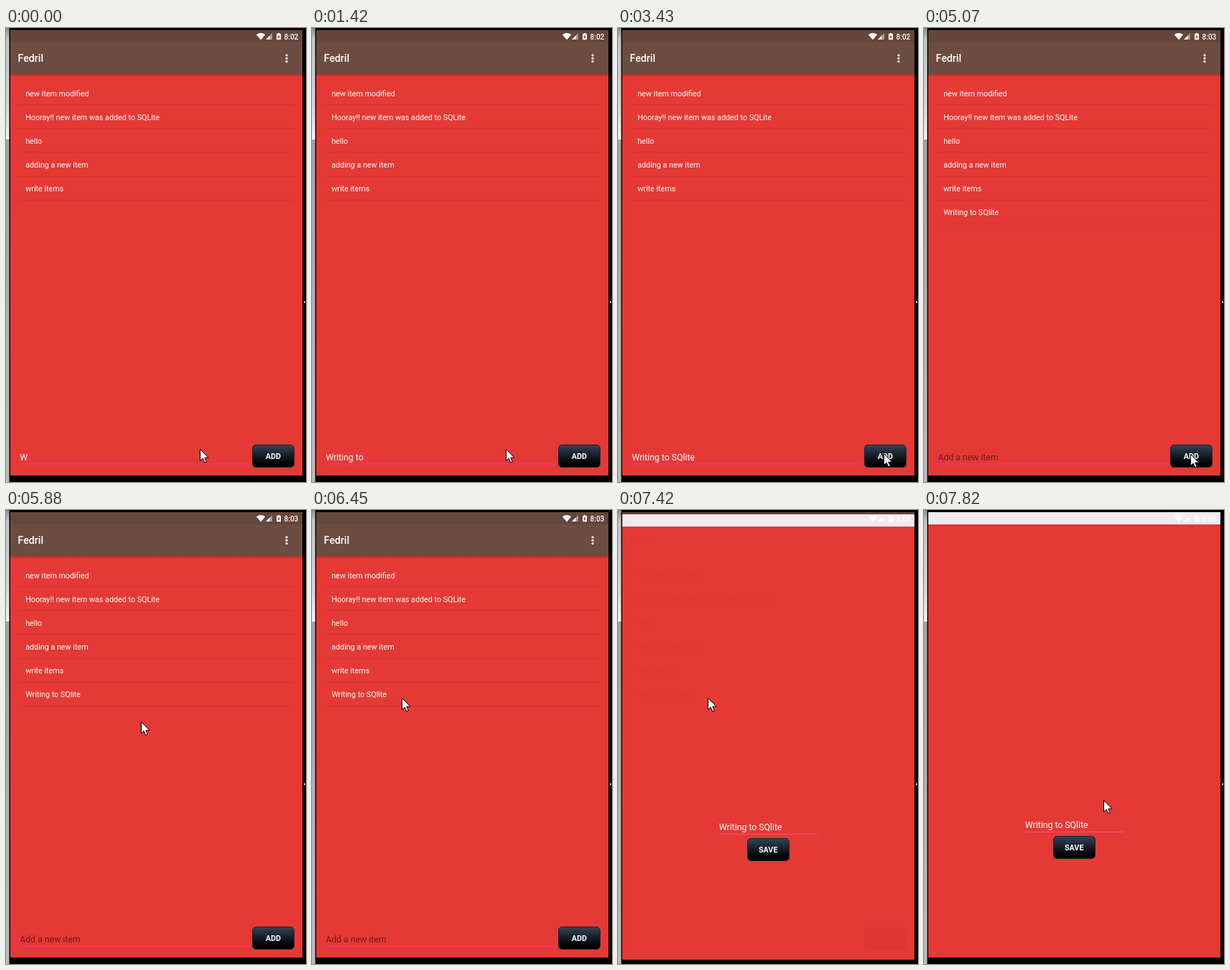
These frames come from a looping animation (418 by 631 pixels, 8000 ms). An HTML page:

```html
<!DOCTYPE html>
<html lang="en">
<head>
<meta charset="utf-8">
<title>To-do list</title>
<style>
html, body { margin: 0; width: 100%; height: 100%; overflow: hidden; background: #000; }
svg { display: block; width: 418px; height: 631px; }
text { font-family: Roboto, "Noto Sans", sans-serif; fill: #fff; white-space: pre; }
.field { font-size: 12.28px; }
.item { font-size: 10.75px; }
.label { font-size: 10.75px; font-weight: 700; text-anchor: middle; }
.title { font-size: 14.2px; font-weight: 500; }
.clock { font-size: 10px; font-weight: 500; }
.hint { fill: #000; opacity: .52; }
.line { fill: #ff2f86; opacity: .8; }
.caret { fill: #f5207c; }
.divider { fill: #000; opacity: .09; }
.ghost text { fill: #000; }
.ghost .divider, .ghost .entry { display: none; }
</style>
</head>
<body>
<svg viewBox="0 0 418 631">
  <defs>
    <linearGradient id="dark" x2="0" y2="1">
      <stop offset="0" stop-color="#33455a"/>
      <stop offset=".5" stop-color="#141c26"/>
      <stop offset=".85" stop-color="#000"/>
    </linearGradient>
    <linearGradient id="shade" x2="0" y2="1">
      <stop offset="0" stop-opacity=".22"/>
      <stop offset="1" stop-opacity="0"/>
    </linearGradient>
    <linearGradient id="edgeTop" x2="0" y2="1">
      <stop offset="0" stop-color="#8c8c8c"/>
      <stop offset=".1" stop-color="#c4c4c4"/>
      <stop offset=".7" stop-color="#d6d6d6"/>
      <stop offset="1" stop-color="#f2f2f2"/>
    </linearGradient>
    <linearGradient id="edgeLow" x2="0" y2="1">
      <stop offset="0" stop-color="#a2a2a2"/>
      <stop offset=".5" stop-color="#b0b0b0"/>
      <stop offset="1" stop-color="#bcbcbc"/>
    </linearGradient>
    <g id="button">
      <rect x=".5" y=".5" width="58" height="31" rx="5" fill="url(#dark)" stroke="#1c2530"/>
    </g>
  </defs>

  <rect width="418" height="631"/>
  <rect width="4.5" height="155" fill="url(#edgeTop)"/>
  <rect y="155" width="4.5" height="476" fill="url(#edgeLow)"/>
  <rect x="415" y="380" width="2" height="2" fill="#ddd"/>

  <rect x="6" y="20" width="407" height="602" fill="#e53935"/>
  <rect x="6" y="3" width="407" height="17" fill="#65463b"/>
  <rect x="6" y="20" width="407" height="44" fill="#6d4c41"/>
  <rect x="6" y="64" width="407" height="4" fill="url(#shade)"/>

  <g id="editor">
    <rect id="strip" x="6" y="3" width="407" height="17"/>
    <rect x="6" y="20" width="407" height="602" fill="#e53935"/>
    <text class="field" x="140.8" y="442">Writing to SQlite</text>
    <rect id="editLine" x="141" y="447" width="137" height="1"/>
    <rect id="editCaret" class="caret" x="228.5" y="429" width="1.3" height="16"/>
    <use href="#button" x="180" y="453"/>
    <text class="label" x="209.2" y="473">SAVE</text>
  </g>

  <g id="content">
    <text class="title" x="16.5" y="47">Fedril</text>
    <g fill="#fff">
      <circle cx="391" cy="37.8" r="1.6"/>
      <circle cx="391" cy="42.2" r="1.6"/>
      <circle cx="391" cy="46.6" r="1.6"/>
    </g>
    <g id="list"></g>
    <g class="entry">
      <text id="typed" class="field" x="19.2" y="601"></text>
      <text id="hint" class="field hint" x="19.2" y="601">Add a new item</text>
      <rect class="line" x="19" y="605" width="321" height="1.5"/>
      <rect id="caret" class="caret" y="588" width="1.2" height="16"/>
    </g>
    <use href="#button" x="343" y="579"/>
    <text class="label" x="372.3" y="599">ADD</text>
  </g>

  <g fill="#fff">
    <path d="M348.8 9.2Q355 5 361.2 9.2L355 16.5Z"/>
    <path d="M371 7V16H362Z" opacity=".45"/>
    <path d="M367.5 10.5V16H362Z"/>
    <path fill-rule="evenodd" d="M377 8.2h1.7V7h2.6v1.2H383V16.3H377ZM380.5 9.3L378.2 12.7H379.6V15.2L381.9 11.7H380.5Z"/>
    <text id="clock" class="clock" x="387.6" y="16"></text>
  </g>

  <path id="mouse" d="M0 0V16L3.7 12.6 6.2 18.5 8.7 17.4 6.3 11.7H11.4Z" fill="#fff" stroke="#000"/>
</svg>
<script>
const LOOP = 8000, ADDED = 5070, OPEN = 7300;
const PHRASE = "Writing to SQlite";
const ITEMS = ["new item modified", "Hooray!! new item was added to SQLite", "hello",
  "adding a new item", "write items", PHRASE];

// Each step: [start time, value...]
const typing = [[0, 1], [280, 2], [710, 5], [840, 6], [990, 7], [1140, 8], [1290, 9], [1420, 11],
  [1720, 12], [1840, 13], [1960, 14], [2360, 15], [2480, 16], [2600, 17], [ADDED, 0]];
const blink = [[0, 1], [3060, 0], [3590, 1], [4120, 0], [4520, 1], [5460, 0], [5880, 1], [6450, 0]];
const moves = [[0, 270, 585], [3060, 277, 586], [3180, 318, 589], [3300, 356, 591], [3430, 370, 591],
  [3590, 370, 592], [3720, 371, 592], [5730, 190, 295], [5880, 188, 294], [6000, 186, 294],
  [6150, 132, 269], [6300, 128, 265], [6450, 125, 261], [7550, 206, 352], [7670, 251, 399], [7820, 250, 403]];
const slide = [[OPEN, 8, .1], [7420, 3, .03], [7550, 1, 0], [7670, 0, 0]];

const el = id => document.getElementById(id);
const at = (steps, t) => steps.findLast(s => s[0] <= t) || steps[0];
const show = (id, on) => el(id).style.display = on ? "" : "none";
const set = (id, attrs) => { for (const k in attrs) el(id).setAttribute(k, attrs[k]); };

el("list").innerHTML = ITEMS.map((label, i) => {
  const y = 94.6 + i * 33.1;
  return `<g><text class="item" x="27.2" y="${y}">${label}</text>
    <rect class="divider" x="17" y="${Math.round(y + 11.6)}" width="384" height="1"/></g>`;
}).join("");
const newRow = el("list").lastElementChild;
newRow.id = "newRow";

function draw(t) {
  const count = at(typing, t)[1];
  el("typed").textContent = PHRASE.slice(0, count);
  show("hint", !count);
  show("newRow", t >= ADDED);
  show("caret", at(blink, t)[1]);
  set("caret", { x: 19 + (count ? el("typed").getComputedTextLength() : 0) });
  el("clock").textContent = t < 4640 ? "8:02" : "8:03";

  const open = t >= OPEN, [start, dy, ghost] = at(slide, t);
  const first = start === OPEN;
  show("editor", open);
  show("editCaret", t < 7670);
  set("editor", { transform: `translate(0 ${dy})` });
  set("strip", { fill: first ? "#e6e4e2" : "#f1eaf0" });
  set("editLine", { fill: first ? "#f29b98" : "#f4527f" });
  set("content", { class: open ? "ghost" : "", opacity: open ? ghost : 1 });

  const [, x, y] = at(moves, t);
  set("mouse", { transform: `translate(${x + .5} ${y + .5})` });
}

function tick() {
  draw(performance.now() % LOOP);
  requestAnimationFrame(tick);
}
tick();
</script>
</body>
</html>
```
